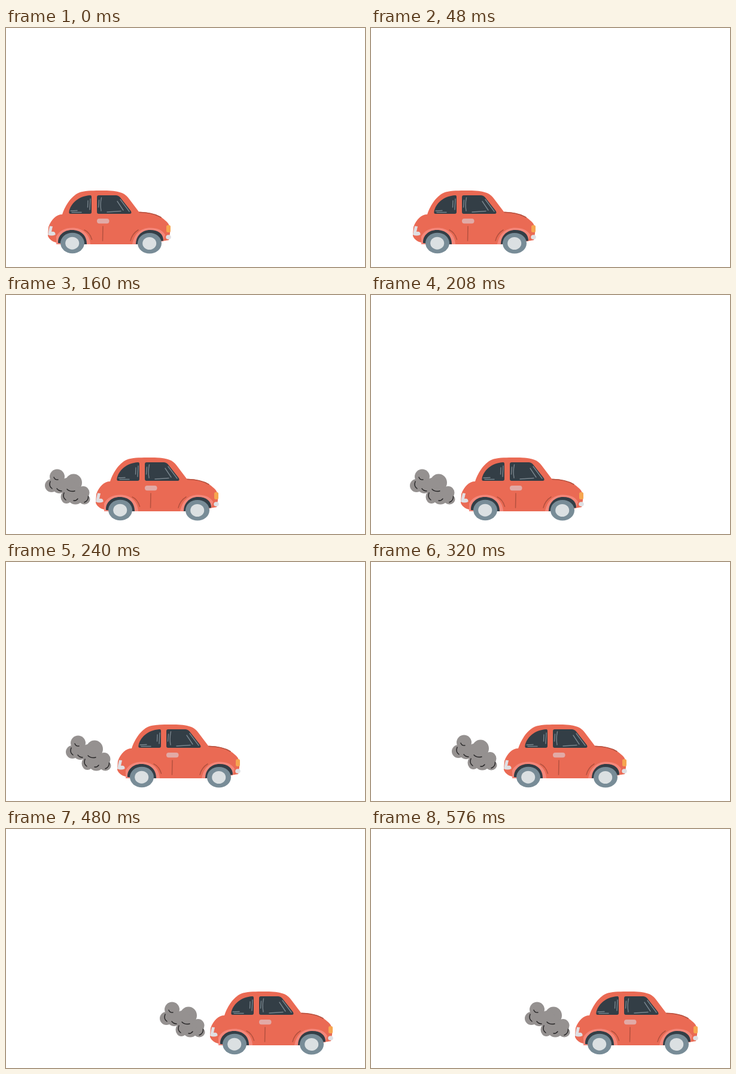
Recreate the animation shown at these times as an HTML page. Size 600 by 400 pixels, loop 640 ms.

```html
<!DOCTYPE html>
<html lang="en">
<head>
<meta charset="utf-8">
<title>Car</title>
<style>
html, body { margin: 0; width: 100%; height: 100%; overflow: hidden; background: #fff; }
svg { display: block; width: 600px; height: 400px; }
.line { fill: none; stroke-linecap: round; }
</style>
</head>
<body>
<svg viewBox="0 0 600 400">
  <defs>
    <g id="wheel">
      <ellipse rx="20" ry="17.3" fill="#788c97"/>
      <ellipse cx="-.3" cy=".2" rx="11.5" ry="10.5" fill="#dbe0e2"/>
    </g>
  </defs>

  <g id="smoke">
    <g fill="#959190">
      <ellipse cx="46.5" cy="302" rx="12.5" ry="12.5"/>
      <ellipse cx="37" cy="317" rx="11" ry="11"/>
      <ellipse cx="50" cy="317" rx="12" ry="13"/>
      <ellipse cx="74" cy="312" rx="14" ry="14.5"/>
      <ellipse cx="64" cy="318" rx="13" ry="14"/>
      <ellipse cx="62" cy="336" rx="9.5" ry="11"/>
      <ellipse cx="77" cy="334" rx="14" ry="14.5"/>
      <ellipse cx="90" cy="329" rx="10.5" ry="11"/>
      <ellipse cx="92" cy="340" rx="9.5" ry="8.5"/>
    </g>
    <path class="line" stroke="#252425" stroke-width="1.4" d="M41 303Q43 308 48 307M35 310Q32 318 38 322M46 322Q49 326 54 326M63 323Q68 328 76 326M58 329Q55 337 61 341M74 342Q78 343 81 339M98.500 335Q99 342 92 345"/>
  </g>

  <g id="car">
    <path fill="#ea6a54" d="M70 346L71 333C76 320 84 312 94 312C99 297 110 279 125 274.500C135 272 148 272 160 272C184 272 197 274 205 285L222 307.500C240 308 257 313 266 322C273 327 275 334 274 344L272 355L259 357L216 362H133L84 359C76 358 69 350 70 346Z"/>
    <g fill="#f4877a">
      <path d="M84 349C89 339 99 334.500 111 334.500C128 334.500 140 345 141 362H84Z"/>
      <path d="M211 362C214 345 225 334.500 241 334.500C252 334.500 261 338 266 346L263 357Z"/>
    </g>
    <g fill="#333e46">
      <path d="M87 360C86 347 97 338 110 338C125 338 135 347 135 362Z"/>
      <path d="M217 362C217 348 227 338 241 338C255 338 263 345 263 356Z"/>
      <path d="M105.500 307C108 294 121 281 141 280Q143 280 143 283V308Q143 311 140 311H108Q104.500 311 105.500 307Z"/>
      <path d="M152 283Q152 280 155 280H184Q189 280.500 192 285L208.500 306Q211.500 311 206 311H155Q152 311 152 308Z"/>
    </g>
    <path class="line" stroke="#78848c" stroke-width="1.4" d="M137 289L136.500 300M141 286L140 304M108 306L119 305.500M110 308.500H126M155.500 288L154.500 300M159.500 284Q157 295 159 306M186 290L196 305M191 287L206 307M169 308L192 306.500"/>
    <path class="line" stroke="#b4513f" stroke-width="1.5" d="M131 338Q140 342 143.500 354M221 338Q211 344 208 356M223 308.500Q245 308.500 259 317M162 332L161.500 356"/>
    <rect x="152" y="319" width="20.500" height="8.200" rx="4" fill="#e2aaa6"/>
    <rect x="268" y="330" width="7" height="12" rx="2.500" fill="#f6a650"/>
    <ellipse cx="271.500" cy="350" rx="4.300" ry="3.800" fill="#dfe0e4"/>
    <path fill="#e0dfe3" d="M73 331.500L78 332L76 341Q83 340 82.500 346Q76 349 70 346Z"/>
    <use href="#wheel" x="111" y="360"/>
    <use href="#wheel" x="240" y="360.300"/>
  </g>
</svg>
<script>
const car = document.getElementById('car');
const smoke = document.getElementById('smoke');
const step = 80, loop = 640;
const carX = [0, 40, 80, 116, 152, 213, 271];
const smokeX = [0, 0, 39, 74, 109, 171, 231];
const smokeY = [0, 0, 2, 1, 0, 0, 0];
const move = (part, x, y) => part.setAttribute('transform', `translate(${x} ${y})`);

// The drive advances in held steps; the last pose is held twice as long.
function draw(now) {
  const i = Math.min(6, Math.floor(now % loop / step));
  move(car, carX[i], 0);
  move(smoke, smokeX[i], smokeY[i]);
  smoke.style.display = i ? '' : 'none';
}

let start;
function tick(now) {
  start ??= now;
  draw(now - start);
  requestAnimationFrame(tick);
}
draw(0);
requestAnimationFrame(tick);
</script>
</body>
</html>
```
